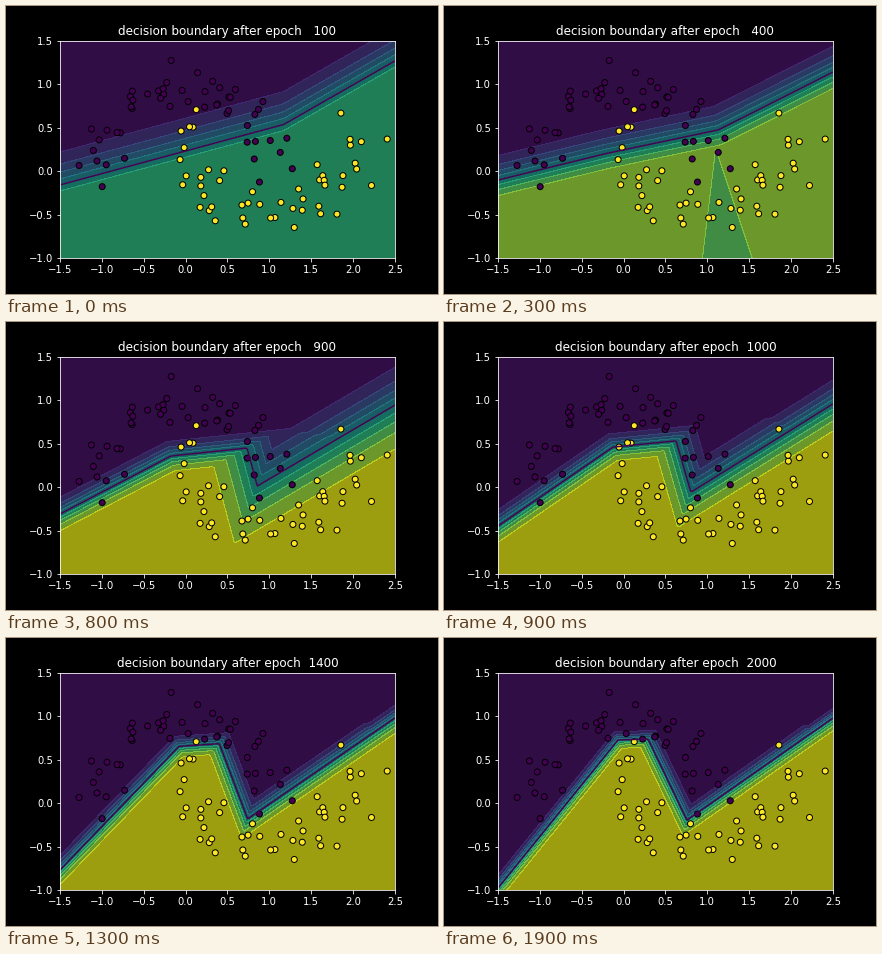
These frames come from a looping animation (432 px wide and 288 px high, 2 s). A matplotlib script:

```python
import numpy as np
import matplotlib.pyplot as plt
from matplotlib.animation import FuncAnimation

W, H, DPI = 432, 288, 72
FRAMES, INTERVAL = 20, 100
X0, X1, Y0, Y1 = -1.5, 2.5, -1.0, 1.5


def make_moons(n=100, noise=0.15, seed=42):
    """Two interleaved half circles with Gaussian noise, in shuffled order."""
    rng = np.random.RandomState(seed)
    t = np.linspace(0, np.pi, n // 2)
    upper = np.column_stack([np.cos(t), np.sin(t)])
    lower = np.column_stack([1 - np.cos(t), 0.5 - np.sin(t)])
    order = np.arange(n)
    rng.shuffle(order)
    points = np.vstack([upper, lower])[order] + rng.normal(scale=noise, size=(n, 2))
    return points, (order >= n // 2).astype(float)


def stage(sharp, left, top, right, steep, bank=None):
    """Sharpness of roof, right side and wedge, then (offset, slope) of five lines."""
    if bank is None:
        bank = (-right[0] / right[1], 1 / right[1])
    return np.array([*sharp, *left, *top, *right, *steep, *bank])


# left, top, right: y = offset + slope * x;  steep, bank: x = offset + slope * y
STAGES = {
    100: stage((6, 6.6, 1.55), (0.23, 0.26), (0.23, 0.26), (-0.11, 0.55),
               (1.97, 0.126), (0.243, -0.347)),
    400: stage((8, 8.2, 1.55), (0.25, 0.236), (0.243, 0.203), (-0.076, 0.485),
               (1.97, 0.126), (0.243, -0.347)),
    700: stage((9.7, 11.5, 1.8), (0.35, 0.348), (0.283, 0.17), (-0.067, 0.477),
               (1.55, -0.175), (0.303, 0.696)),
    900: stage((12.8, 5.8, 5), (0.444, 0.503), (0.374, 0.101), (-0.474, 0.566),
               (0.86, -0.28)),
    1200: stage((16, 14.7, 13), (0.69, 0.897), (0.617, 0.084), (-0.655, 0.653),
                (0.676, -0.33)),
    2000: stage((23, 24, 18), (0.803, 1.187), (0.727, 0.03), (-0.706, 0.673),
                (0.659, -0.498)),
}
EPOCHS = np.array(list(STAGES))
TABLE = np.array(list(STAGES.values()))


def probability(x, y, epoch):
    """Piecewise linear score: a bent band cut by a wedge, limited by confidence."""
    # learning slows down, so the lines settle along -1 / epoch
    v = [np.interp(-1 / epoch, -1 / EPOCHS, col) for col in TABLE.T]
    roof, side, wedge = v[:3]
    left, top, right, steep, bank = zip(v[3::2], v[4::2])

    def ramp(sharp, line, along, across):
        offset, slope = line
        return sharp * (offset + slope * along - across) / np.hypot(1, slope)

    band = np.minimum(ramp(roof, left, x, y), ramp(roof, top, x, y))
    band = np.maximum(band, ramp(side, right, x, y))
    valley = np.maximum(ramp(wedge, steep, y, x), -ramp(wedge, bank, y, x))
    confidence = 0.62 + 0.0043 * (epoch - 100)
    score = np.minimum(np.minimum(band, valley), confidence)
    return 1 / (1 + np.exp(-score))


plt.style.use("dark_background")
plt.rcParams.update({"font.family": "DejaVu Sans", "font.size": 10,
                     "text.kerning_factor": 6})
fig, ax = plt.subplots(figsize=(W / DPI, H / DPI), dpi=DPI, facecolor="black")
fig.subplots_adjust(left=0.125, right=0.9, bottom=0.125, top=0.88)
ax.set(xlim=(X0, X1), ylim=(Y0, Y1),
       xticks=np.arange(X0, X1 + 0.1, 0.5), yticks=np.arange(Y0, Y1 + 0.1, 0.5))
title = ax.set_title("", fontsize=12)

points, labels = make_moons()
ax.scatter(*points.T, c=labels, cmap="viridis", s=36, edgecolors="black",
           linewidths=1, zorder=1.5)

gx, gy = np.meshgrid(np.linspace(X0, X1, 201), np.linspace(Y0, Y1, 201))
LEVELS = np.linspace(0, 1, 11)
DARK = plt.get_cmap("viridis")(0.0)
drawn = []


def update(i):
    epoch = 100 * (i + 1)
    while drawn:
        drawn.pop().remove()
    p = probability(gx, gy, epoch)
    drawn.append(ax.contourf(gx, gy, p, levels=LEVELS, cmap="viridis",
                             vmin=0, vmax=1, alpha=0.7))
    drawn.append(ax.contour(gx, gy, p, levels=[0.5], colors=[DARK], linewidths=1.5))
    title.set_text(f"decision boundary after epoch {epoch:5d}")
    return [*drawn, title]


anim = FuncAnimation(fig, update, frames=FRAMES, interval=INTERVAL,
                     init_func=lambda: update(0), repeat=True, repeat_delay=0, blit=False)
plt.show()
```
